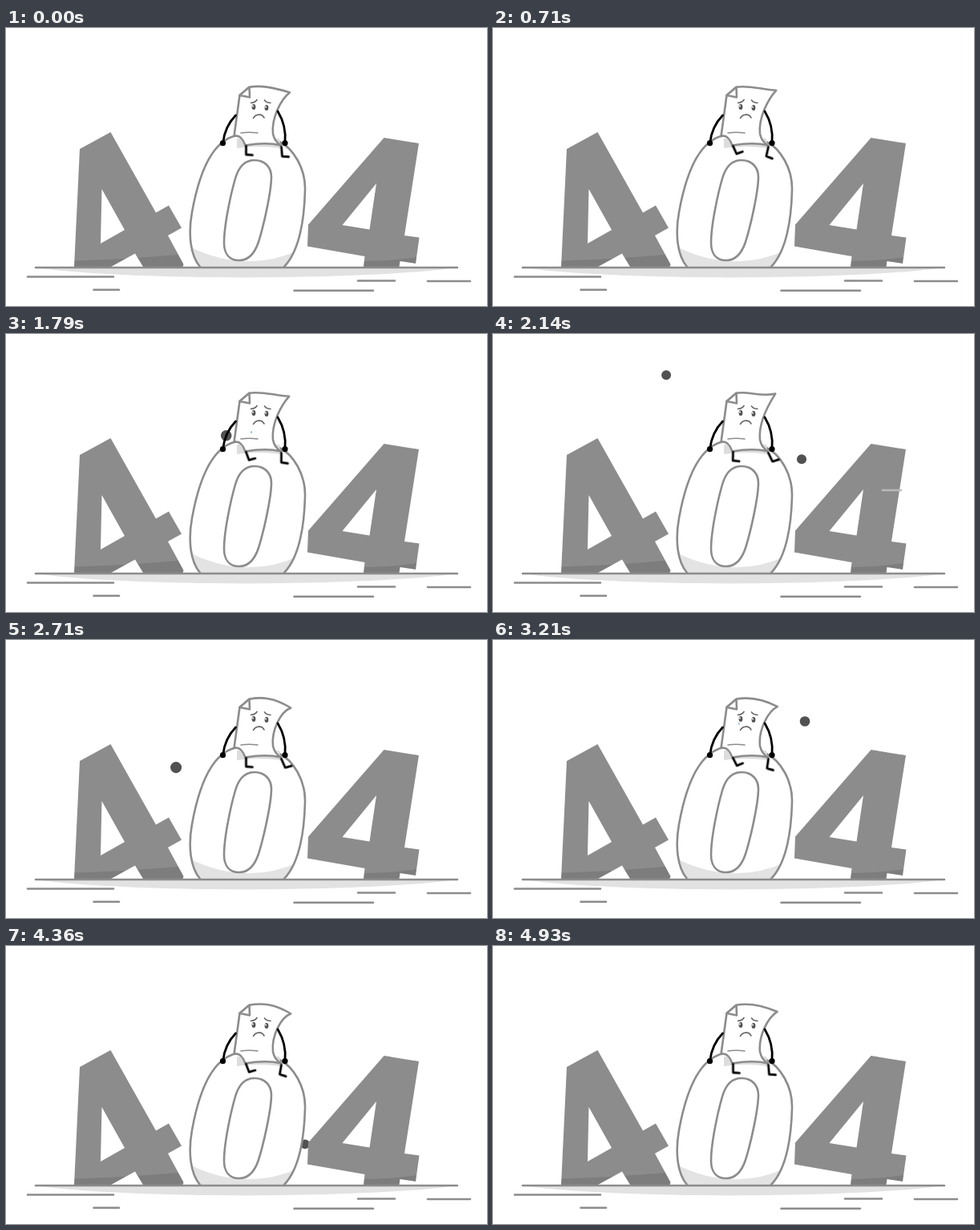
An HTML page for the animation above (5000 ms loop, 600 by 347 pixels).

```html
<!DOCTYPE html>
<html lang="en">
<head>
<meta charset="utf-8">
<title>404</title>
<style>
html, body { margin: 0; width: 100%; height: 100%; overflow: hidden; background: #fff; }
svg { display: block; width: 100%; height: 100%; }
.line { fill: none; stroke: #8c8c8c; stroke-width: 2.6; stroke-linecap: round; stroke-linejoin: round; }
.white { fill: #fff; }
.digit { fill: #8c8c8c; }
.shade { fill: #000; fill-opacity: .11; }
.limb { fill: none; stroke: #000; stroke-width: 2.8; stroke-linecap: round; stroke-linejoin: round; }
.face { fill: none; stroke: #666; stroke-width: 1.6; stroke-linecap: round; }
.streak { stroke: #b9b9b9; stroke-width: 2.6; stroke-linecap: round; }
.leg { animation: 5s ease-in-out infinite; }
#legL { animation-name: swingL; }
#legR { animation-name: swingR; }
#tear { fill: #4f9fe6; animation: cry 5s linear infinite; }
@keyframes swingL {
  0%, 100% { transform: rotate(0deg); }
  25.6%, 74.5% { transform: rotate(-41deg); }
  47.5% { transform: rotate(6deg); }
}
@keyframes swingR {
  0%, 100% { transform: rotate(-5deg); }
  25.6%, 74.5% { transform: rotate(25deg); }
  47.5% { transform: rotate(-31deg); }
}
@keyframes cry {
  0%, 17.6%, 38%, 61%, 81.4%, 100% { transform: translate(307px, 103px) scale(0); }
  25.8%, 69.2% { transform: translate(306.7px, 106.7px) scale(.8); }
  32.4%, 75.8% { transform: translate(306.3px, 112px) scale(1); }
  37.6%, 81% { transform: translate(306px, 128px) scale(0); }
}
</style>
</head>
<body>
<svg viewBox="0 0 600 347" preserveAspectRatio="none">
  <defs>
    <path id="four1" d="M92 151 130.5 130 187 230.5 203 221.5 219 249.5 202 259 221.5 295 220.5 298H171L161 281.5 131 298H85ZM119.5 201 118 269 148 252Z" fill-rule="evenodd" clip-rule="evenodd"/>
    <path id="four2" d="M471.5 137 515 144 497 259 515.5 261.5 511 294 491.5 291 490.5 298H446L447.5 285 376 272.5 377 245.5ZM462 194 419.5 246 453.5 251.5Z" fill-rule="evenodd" clip-rule="evenodd"/>
    <path id="zero" d="M242 298C230 284 227 258 232 230 238 197 252 143 286 134.5L341 142C358 150 374 175 373 203 372 240 366 278 347 298"/>
    <clipPath id="inFour1"><use href="#four1"/></clipPath>
    <clipPath id="inFour2"><use href="#four2"/></clipPath>
    <clipPath id="inZero"><use href="#zero"/></clipPath>
  </defs>

  <path d="M37 299H563C450 315.5 150 315.5 37 299" fill="#e2e2e2"/>
  <g id="dots" fill="#515151"></g>

  <use href="#four1" class="digit"/>
  <use href="#four2" class="digit"/>
  <use href="#zero" class="white"/>
  <path class="shade" clip-path="url(#inFour1)" d="M80 290.5Q150 289 225 282V299H80Z"/>
  <path class="shade" clip-path="url(#inFour2)" d="M440 291Q480 291 520 285V299H440Z"/>
  <path class="shade" clip-path="url(#inZero)" d="M225 271Q300 310 372 274V299H225Z"/>
  <use href="#zero" class="line"/>
  <path class="line" d="M310 165C323 165 331 174 331 186 331 203 322 245 315 267 310 282 302 290 291 290 278 290 272 281 272 268 272 245 281 205 286 188 290 174 298 165 310 165Z"/>
  <path class="line" d="M37 299H563M27 310.5H134M109.5 326.7H141M359.5 327.7H458M439 315.5H485M526 316H579"/>

  <path d="M288 138H341L343 150Q315 146 288 150Z" fill="#ddd"/>
  <path id="sheet" class="line" style="fill:#fff"/>
  <path class="line" style="fill:#fff" d="M291.5 84 303.5 73.8 304 86.5Z"/>
  <path class="line" style="stroke-width:1.6" d="M293 131Q303 129.5 314 131"/>

  <path class="face" d="M305.5 93.5Q311 93 313 89.500M322.5 90Q325 93.5 330 93.500M308.5 112.5C312 107 319 106.5 322 112"/>
  <g fill="#555">
    <ellipse cx="309" cy="98.5" rx="2.4" ry="3.6"/>
    <ellipse cx="325" cy="99.5" rx="2.4" ry="3.6"/>
  </g>
  <g fill="#fff"><circle cx="308" cy="97.5" r="1"/><circle cx="324" cy="98.5" r="1"/></g>
  <circle id="tear" r="3"/>

  <path class="limb" d="M286.5 109Q273 123 270.7 143M339 104Q350 122 348 143"/>
  <circle cx="270.5" cy="143.7" r="3.6"/>
  <circle cx="348" cy="143.7" r="3.6"/>
  <g transform="translate(299.5 147.5)"><path id="legL" class="leg limb" d="M0 0V10.5L8 11.2"/></g>
  <g transform="translate(343.5 148.5)"><path id="legR" class="leg limb" d="M0 0V11.8L8 13"/></g>
  <g id="streaks"></g>
</svg>
<script>
const LOOP = 5000, LEFT = 62;
const $ = id => document.getElementById(id);

// Dots cross from the left edge at a steady pace; ys are Bezier heights
const flights = [
  { start: 420, time: 1520, to: 542, ys: [250, 190, 150, 190] },
  { start: 1115, time: 1520, to: 541, ys: [150, 51, 198, 170] },
  { start: 1800, time: 1090, to: 556, ys: [208, -113, 134, 221] },
  { start: 2286, time: 1520, to: 600, ys: [280, 95, 57, 148] },
  { start: 3390, time: 1410, to: 514, ys: [194, 251, 343, 120] }
];

const high = { time: 440, y: 57.5, from: 340, to: 540, size: 68 };
const low = { time: 350, y: 195, from: 388, to: 520, size: 45 };
const gusts = [{ ...high, start: 1060 }, { ...low, start: 1850 }, { ...low, start: 3588 }];

const mix = (a, b, p) => a + (b - a) * p;

// De Casteljau
const bezier = (v, p) => v.length < 2 ? v[0] : bezier(v.slice(1).map((b, i) => mix(v[i], b, p)), p);

function add(parent, tag, cls) {
  const el = document.createElementNS("http://www.w3.org/2000/svg", tag);
  el.setAttribute("class", cls);
  return $(parent).appendChild(el);
}

function put(el, attrs) {
  for (const k in attrs) el.setAttribute(k, attrs[k]);
}

const dots = flights.map(() => add("dots", "circle", "dot"));
const streaks = gusts.map(() => add("streaks", "line", "streak"));

function drawDot(el, { start, time, to, ys }, t) {
  const p = (t - start) / time;
  if (p <= 0 || p >= 1) return put(el, { r: 0 });
  const grow = Math.min(1, (t - start) / 400), shrink = (1 - p ** 3) ** .45;
  put(el, { cx: mix(LEFT, to, p), cy: bezier(ys, p), r: 7.1 * grow * shrink });
}

function drawStreak(el, { start, time, y, from, to, size }, t) {
  const p = (t - start) / time, on = p > 0 && p < 1;
  const x = mix(from, to, p), half = on ? size * Math.sin(Math.PI * p) / 2 : 0;
  put(el, { x1: x - half, x2: x + half, y1: y, y2: y, visibility: on ? "visible" : "hidden" });
}

// The free corner flaps three times per loop
function drawSheet(t) {
  const flap = Math.sin(6 * Math.PI * t / LOOP);
  const x = 354 - 1.8 * flap, y = 80.5 - 6 * flap;
  put($("sheet"), { d:
    `M291.5 84 303.5 73.8C318 71 334 ${74.5 + 4.5 * flap} ${x} ${y}` +
    "C343 89 331 112 333 132Q335 142 343 146.5Q325 142 298.5 146.5Q294 134 286.5 134.5L284.5 135Z" });
}

function draw(t) {
  flights.forEach((f, i) => drawDot(dots[i], f, t));
  gusts.forEach((g, i) => drawStreak(streaks[i], g, t));
  drawSheet(t);
}

let t0;
function tick(now) {
  t0 ??= now;
  draw((now - t0) % LOOP);
  requestAnimationFrame(tick);
}
draw(0);
requestAnimationFrame(tick);
</script>
</body>
</html>
```
